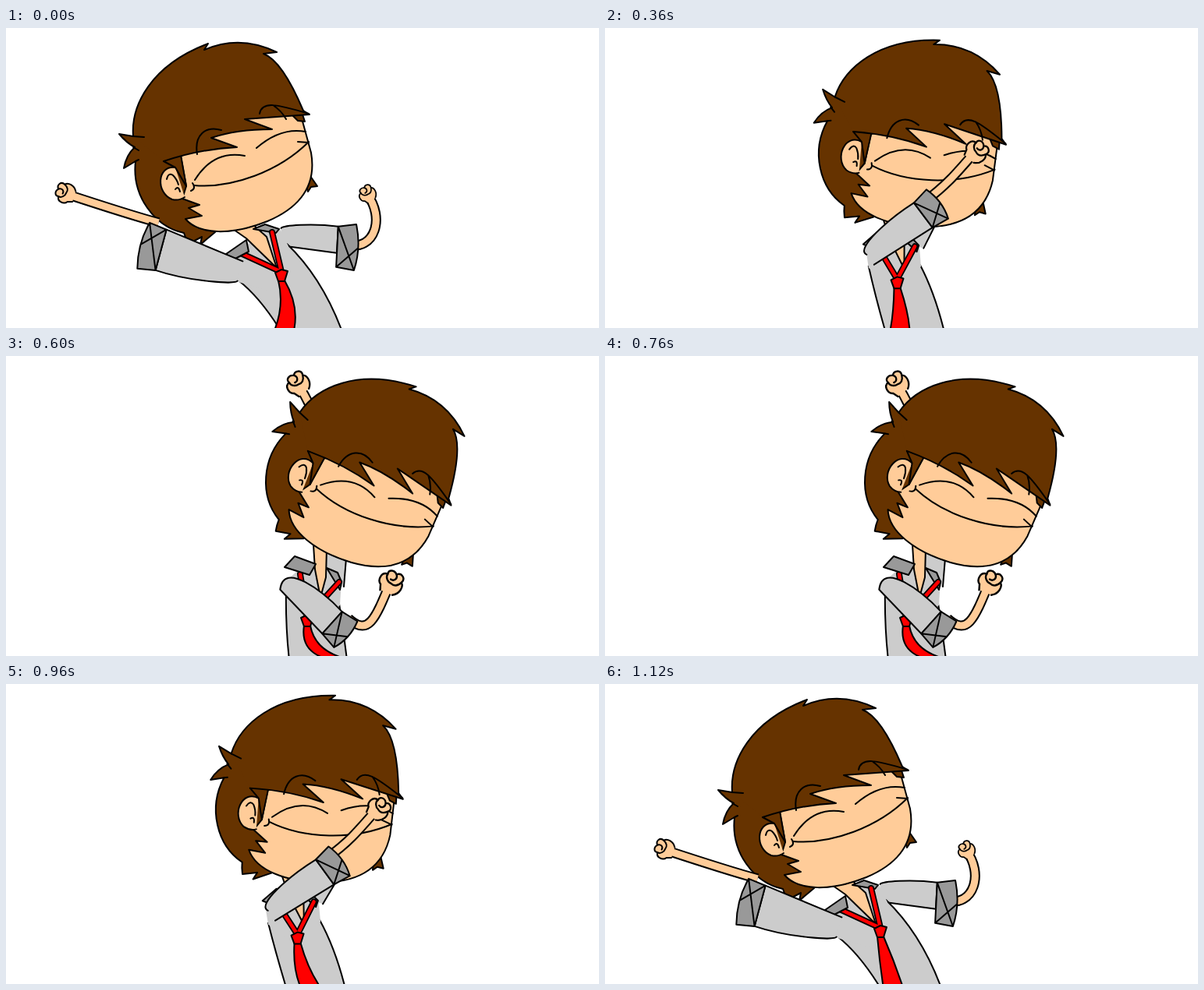
An HTML page for the animation above (1280 ms loop, 760 px wide and 385 px high).

```html
<!DOCTYPE html>
<html lang="en">
<head>
<meta charset="utf-8">
<title>Dance</title>
<style>
  html, body { margin: 0; width: 100%; height: 100%; overflow: hidden; background: #fff; }
  svg { display: block; width: 760px; height: 385px; }
  path { fill: none; stroke: #000; stroke-width: 2; stroke-linejoin: round; stroke-linecap: round; }
  .skin { fill: #fc9; }
  .hair { fill: #630; }
  .shirt { fill: #ccc; }
  .dark { fill: #999; }
  .red { fill: #f00; }
  .bare { stroke: none; }
  .armEdge { stroke-width: 13; stroke-linecap: butt; }
  .arm { stroke: #fc9; stroke-width: 9; stroke-linecap: butt; }
  .strapEdge { stroke-width: 8; }
  .strap { stroke: #f00; stroke-width: 4.5; }
</style>
</head>
<body>
<svg viewBox="0 0 760 385">
  <defs>
    <g id="fist">
      <path class="skin" d="M11-7C7-14-2-15-5-11C-11-14-15-7-11-3C-15 1-13 7-8 6C-8 13 2 14 5 9L11 7"/>
      <path d="M-11-3C-7-6-3-3-4 1M-8 6C-4 7 0 3 0-1M-5-11C-1-9 2-6 0-1"/>
    </g>
  </defs>
  <g id="back"></g>
  <g id="torso"></g>
  <g id="head">
    <path class="hair" d="M163 139L145 136Q154 147 165 153Q154 163 151 180L166 171C161 215 190 255 228 263Q230 270 234 277L251 268L249 278L268 262L300 200L300 130Z"/>
    <path class="hair" d="M390 190L399 203L391 204L387 210L384 200"/>
    <path class="skin" d="M224 165L231 203L226 219L248 227L234 231L251 241L230 245C248 266 290 266 335 248C380 229 398 200 391 160L376 105L300 105Z"/>
    <path class="skin" d="M217 179C193 176 192 212 213 220Q222 222 229 217"/>
    <path class="hair" d="M202 171L217 179L231 203L224 163"/>
    <path d="M206 194Q208 185 214 189Q219 194 221 201M217 207Q221 202 223 210M237 209Q244 206 239 199"/>
    <path class="hair" d="M368 113L374 119L383 120L379 108"/>
    <path class="hair" d="M163 139C160 100 185 48 259 20L254 28Q300 8 347 31L330 33Q354 42 381 106L389 111L306 117L341 130Q295 130 263 141L296 153Q250 155 202 171"/>
    <path d="M163 139L177 140M163 153L170 157M166 171L170 169"/>
    <path d="M245 162C241 138 255 125 276 131M325 110C328 94 345 97 388 110M342 99Q353 106 359 117"/>
    <path d="M242 195C258 169 280 159 306 164M321 154Q352 127 384 133"/>
    <path d="M241 202C290 206 350 184 388 146M374 146L388 147"/>
  </g>
  <g id="front"></g>
</svg>
<script>
const LOOP = 1280, STEP = 40, LAST_STEP = 1120;
const NS = "http://www.w3.org/2000/svg";
const $ = id => document.getElementById(id);

const ramp = (t, from, to) => Math.max(0, Math.min(1, (t - from) / (to - from)));
const mix = (a, b, f) => a + (b - a) * f;
const bump = f => Math.sin(Math.PI * f);
const rad = deg => deg * Math.PI / 180;
const polar = ([x, y], deg, r) => [x + r * Math.cos(rad(deg)), y + r * Math.sin(rad(deg))];

// d`M${point}L${point}` rounds the points of a path.
const d = (text, ...points) =>
  text.reduce((s, part, i) => s + points[i - 1].map(v => v.toFixed(1)).join(" ") + part);

function add(parent, tag, cls) {
  const el = document.createElementNS(NS, tag);
  if (cls) el.setAttribute("class", cls);
  return $(parent).appendChild(el);
}
const path = (parent, cls) => add(parent, "path", cls);
const setPath = (el, value) => el.setAttribute("d", value);

// A torso shape goes straight from its leaning to its turned outline.
function morph(cls, lean, turned) {
  const el = path("torso", cls);
  const end = turned.match(/\d+/g);
  return u => {
    let i = 0;
    setPath(el, lean.replace(/\d+/g, n => mix(+n, +end[i++], u).toFixed(1) + " "));
  };
}

// Places points along and across a sleeve that starts at the shoulder.
const frame = (root, deg) => (along, across) =>
  polar(polar(root, deg, along), deg + 90, across);

function makeArm(parent) {
  const sleeve = path(parent, "shirt");
  const edge = path(parent, "armEdge"), skin = path(parent, "arm");
  const fist = add(parent, "use");
  fist.setAttribute("href", "#fist");
  const cuff = path(parent, "dark");

  return ({ at, length, width, shoulder, round, flare, curve, size }) => {
    setPath(sleeve, d`M${at(0, shoulder)}Q${at(length / 2, (width + shoulder) / 2)} ${at(length, width)}` +
      d`L${at(length, -width)}C${at(length * .55, -width - 3)} ${at(-22 * round, -shoulder * 1.35)} ` +
      d`${at(0, -shoulder * (1 - 2 * round))}`);

    const rim = length + 23;
    const inA = at(length, -width), inB = at(length, width + flare);
    const outA = at(rim, -width - 4), outB = at(rim, width + flare + 3);
    const mid = at(rim + 8, flare / 2);
    setPath(cuff, d`M${inA}L${outA}Q${mid} ${outB}L${inB}ZL${outB}M${at(rim + 4, flare / 2)}L${inB}`);

    const [exit, bend, wrist, hand] = curve;
    [edge, skin].forEach(el => setPath(el, d`M${exit}C${bend} ${wrist} ${hand}`));
    const turn = Math.atan2(wrist[1] - hand[1], wrist[0] - hand[0]) * 180 / Math.PI;
    fist.setAttribute("transform", `translate(${hand}) rotate(${turn}) scale(${size})`);
  };
}

const farArm = makeArm("back");
const body = [
  morph("shirt", "M298 324Q326 346 353 390L431 390Q405 320 360 277", "M359 296Q358 346 363 390L437 390Q432 350 427 318"),
  morph("shirt bare", "M298 326L285 296L300 285L335 258L351 258L362 280L345 340", "M359 298L362 286L380 270L412 265L430 285L428 320L395 340"),
  morph("skin", "M288 256L308 270L347 308L334 268L312 248", "M394 242L396 274L403 310L410 284L411 246"),
  morph("dark", "M317 258L332 252L350 258L346 263Z", "M411 272L425 278L430 290L428 300Z")
];
const straps = [path("torso", "strapEdge"), path("torso", "strap")];
body.push(morph("dark", "M282 290L308 272L311 287L290 298Z", "M357 271L370 257L397 267L389 281Z"));
const tail = path("torso", "red"), knot = path("torso", "red");
setPath(knot, "M-8-4L0-8L8-6L4 7L-4 7Z");
const nearArm = makeArm("front");

function drawNearArm(a) {
  const ease = 1 - (1 - a) ** 2.4;
  const root = [300 + 60 * a, 290 + 22 * (1 - a) ** 2];
  const length = 105 - 27 * a;
  const at = frame(root, 195 + 207 * a);
  const across = mix(33, -18, ease);
  const exit = at(length + 12, across), bend = at(length + 46, across);
  const hand = polar(at(length + 12, 0), mix(212, 318, ease), 88 + 42 * (1 - a) ** 2);
  const wrist = bend.map((v, i) => mix(v, hand[i], .3));
  nearArm({ at, length, width: 27 - 8 * ease, shoulder: 13, round: a * a, flare: 0,
    curve: [exit, bend, wrist, hand], size: 1 + .2 * a });
}

function drawFarArm(u, settle) {
  const root = [352 + 70 * u, 268 + 28 * u * u];
  const length = 73 - 25 * bump(u);
  const at = frame(root, 3 - 93 * Math.min(1, 1.3 * u));
  const hand = [
    463 - 85 * (1 - (1 - u) ** 2) - 4 * settle,
    214 - 179 * Math.min(1, 1.24 * u) + 2 * settle
  ];
  const wrist = [hand[0] + 22, hand[1] + 28];
  farArm({ at, length, width: 17 + 6 * bump(u), shoulder: 11, round: 0, flare: 18 * (1 - u),
    curve: [at(length + 12, 6), at(length + 50, 12), wrist, hand], size: .85 + .3 * u * u });
}

function drawTie(u, t) {
  const x = 353 + 33 * u, y = 318 + 22 * u * u;
  // The end lags behind the turn and swings back late.
  const sway = 3 + 32 * (ramp(t, 400, 600) - ramp(t, 800, 920)) + 25 * bump(ramp(t, 920, 1160));
  const end = x + sway, bow = x + (14 - .4 * sway) * (1 - u);
  knot.setAttribute("transform", `translate(${x} ${y})`);
  setPath(tail, d`M${[x - 4, y + 6]}Q${[bow - 9, y + 38]} ${[end - 12, 388]}` +
    d`L${[end + 13, 388]}Q${[bow + 10, y + 38]} ${[x + 4, y + 6]}Z`);
  const left = [mix(303, 377, u), mix(290, 280, u)];
  const right = [mix(341, 427, u), mix(262, 290, u)];
  straps.forEach(el => setPath(el, d`M${left}L${[x, y - 5]}L${right}`));
}

function draw(time) {
  const t = Math.min(LAST_STEP, Math.floor(time / STEP) * STEP);
  const back = 1 - ramp(t, 882, 1089);
  const u = Math.min(ramp(t, 210, 440), back);
  const swing = Math.min(ramp(t, 230, 440), back);

  const turn = 38.6 * (u + .08 * Math.sin(2 * Math.PI * u));
  $("head").setAttribute("transform",
    `translate(${275 + 182 * u} ${150 + u - 10 * bump(u)}) rotate(${turn}) translate(-275 -150)`);
  body.forEach(shape => shape(u));
  drawTie(u, t);
  drawFarArm(u, ramp(t, 440, 600) * back);
  drawNearArm(swing);
}

const start = performance.now();
function tick() {
  draw((performance.now() - start) % LOOP);
  requestAnimationFrame(tick);
}
tick();
</script>
</body>
</html>
```
